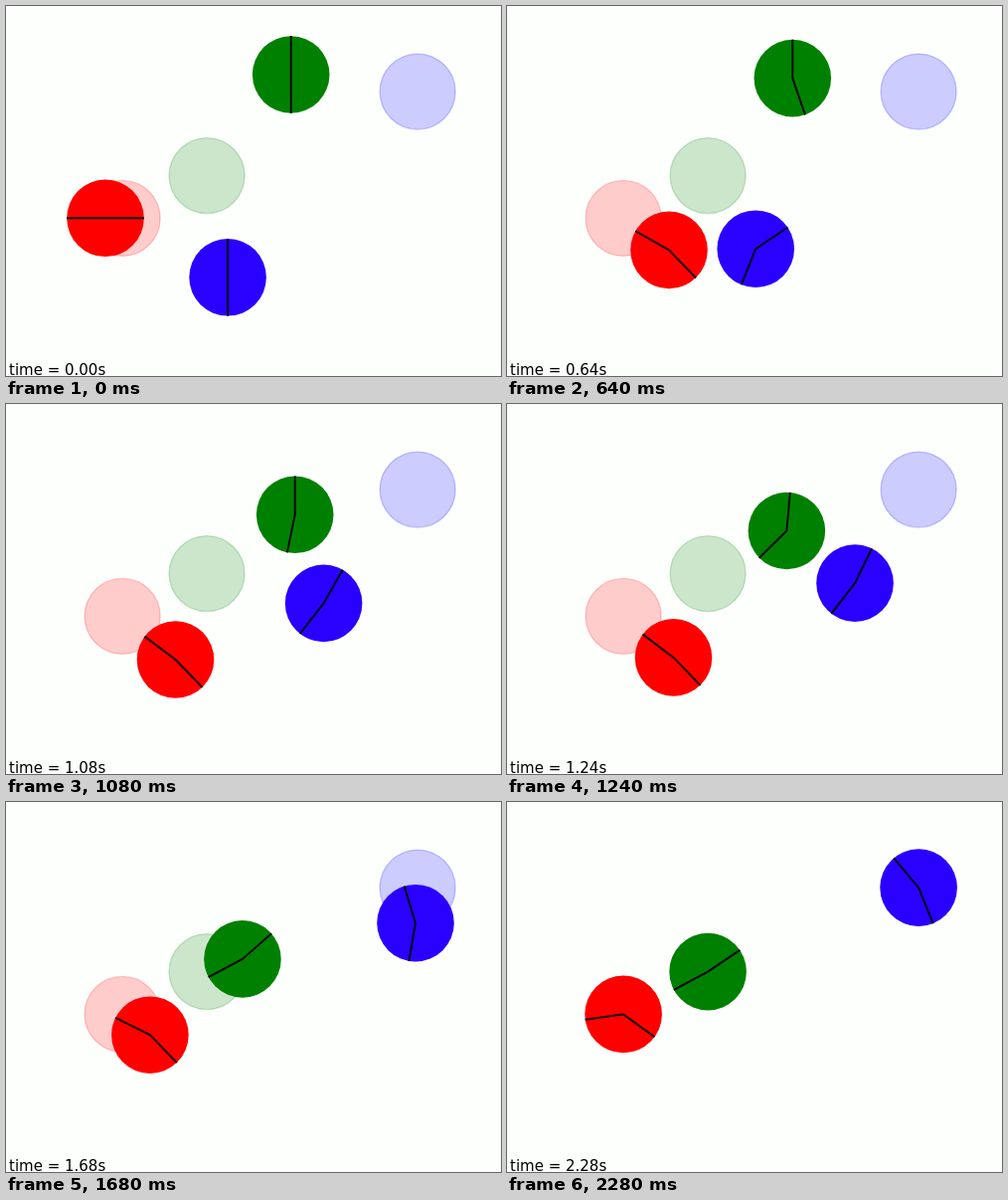
Animation, 498 px wide and 372 px high, one loop 2.32 s. Source, as an HTML page:

```html
<!DOCTYPE html>
<html lang="en">
<head>
<meta charset="utf-8">
<title>Moving discs</title>
<style>
  html, body { margin: 0; width: 100%; height: 100%; overflow: hidden; background: #fdfffd; }
  svg { display: block; width: 498px; height: 372px; }
  text { font: 15px "DejaVu Sans", sans-serif; white-space: pre; }
  .goal { stroke-opacity: .2; stroke-width: 1.4; }
  .arms { fill: none; stroke: #000; stroke-width: 1.9; stroke-linecap: square; stroke-linejoin: round; }
</style>
</head>
<body>
<svg viewBox="0 0 498 372">
  <g id="goals"></g>
  <g id="discs"></g>
  <text id="clock" x="3" y="371">time = 0.00s</text>
</svg>
<script>
const LOOP = 2320, STEP = 40, END = 2.28, R = 38.8;

// path: [seconds, x, y] waypoints before the disc comes to rest on its goal.
// arms: first angle in degrees, then eased swings [from, to, turn].
const discs = [
  { color: '#ff0000', tint: '#ff0000', goal: [117.1, 213.4],
    path: [[0, 100, 213.3], [.32, 133, 220], [.64, 163, 245.4],
           [1.08, 170.5, 257], [1.4, 162, 250.2], [1.96, 127.3, 218.6]],
    arms: [[180, [0, .9, -37], [1.4, END, 45]],
           [0, [0, .4, -46], [1.96, END, 10]]] },
  { color: '#008000', tint: '#008000', goal: [202.1, 170.6],
    path: [[0, 286.7, 69], [.32, 286.3, 64.5], [.64, 287.3, 72.6],
           [1.08, 290.7, 111.3], [1.4, 268.5, 142.4], [1.96, 211.1, 166]],
    arms: [[90, [1.1, 1.85, -56]],
           [-90, [0, .3, 19], [.85, 1.4, -81]]] },
  { color: '#2a00ff', tint: '#0000ff', goal: [414.1, 86.1],
    path: [[0, 223.1, 272.8], [.32, 225, 264.4], [.64, 250.2, 244.2],
           [1.08, 319.6, 200.4], [1.4, 378.6, 158.8], [1.68, 412, 121.7], [1.96, 415.1, 96.5]],
    arms: [[90, [0, .6, -56], [.64, 1.2, 30], [1.4, 1.96, 86], [1.96, END, -20]],
           [-90, [.2, 1, -38], [1.2, 2.2, 60]]] }
];

// Smooth curve through uneven keys that ends at rest
function curve(t, v) {
  const n = t.length - 1, h = [], s = [], m = [];
  for (let i = 0; i < n; i++) {
    h[i] = t[i + 1] - t[i];
    s[i] = (v[i + 1] - v[i]) / h[i];
  }
  for (let i = 1; i < n; i++) m[i] = (s[i - 1] * h[i] + s[i] * h[i - 1]) / (h[i - 1] + h[i]);
  const first = 2 * s[0] - m[1];
  m[0] = first * s[0] > 0 ? first : 0;
  m[n] = 0;
  return time => {
    let i = 0;
    while (i < n - 1 && time > t[i + 1]) i++;
    const u = (time - t[i]) / h[i], w = 1 - u;
    return v[i] * (1 + 2 * u) * w * w + v[i + 1] * u * u * (3 - 2 * u)
      + h[i] * u * w * (m[i] * w - m[i + 1] * u);
  };
}

function ease(from, to, time) {
  const u = Math.min(1, Math.max(0, (time - from) / (to - from)));
  return u * u * (3 - 2 * u);
}

function angle([base, ...swings], time) {
  return swings.reduce((sum, [from, to, turn]) => sum + turn * ease(from, to, time), base);
}

function add(parent, tag, attrs) {
  const el = document.createElementNS('http://www.w3.org/2000/svg', tag);
  for (const k in attrs) el.setAttribute(k, attrs[k]);
  return document.getElementById(parent).appendChild(el);
}

for (const d of discs) {
  const [cx, cy] = d.goal;
  add('goals', 'circle', { class: 'goal', cx, cy, r: 38, stroke: d.tint,
    fill: `color-mix(in srgb, ${d.tint} 20%, white)` });
  d.body = add('discs', 'circle', { r: R, fill: d.color });
  d.line = add('discs', 'path', { class: 'arms' });
  const keys = [...d.path, [END, cx, cy]], t = keys.map(k => k[0]);
  d.x = curve(t, keys.map(k => k[1]));
  d.y = curve(t, keys.map(k => k[2]));
}

const clock = document.getElementById('clock');

function tip(x, y, deg) {
  const r = deg * Math.PI / 180, len = R - .9;
  return `${x + len * Math.cos(r)} ${y - len * Math.sin(r)}`;
}

function draw(time) {
  for (const d of discs) {
    const x = d.x(time), y = d.y(time);
    const [a, b] = d.arms.map(arm => tip(x, y, angle(arm, time)));
    d.body.setAttribute('cx', x);
    d.body.setAttribute('cy', y);
    d.line.setAttribute('d', `M${a}L${x} ${y}L${b}`);
  }
  clock.textContent = `time = ${time.toFixed(2)}s`;
}

const start = performance.now();
function tick(now) {
  const ms = Math.max(0, now - start) % LOOP;
  draw(Math.floor(ms / STEP) * STEP / 1000);
  requestAnimationFrame(tick);
}
draw(0);
requestAnimationFrame(tick);
</script>
</body>
</html>
```
